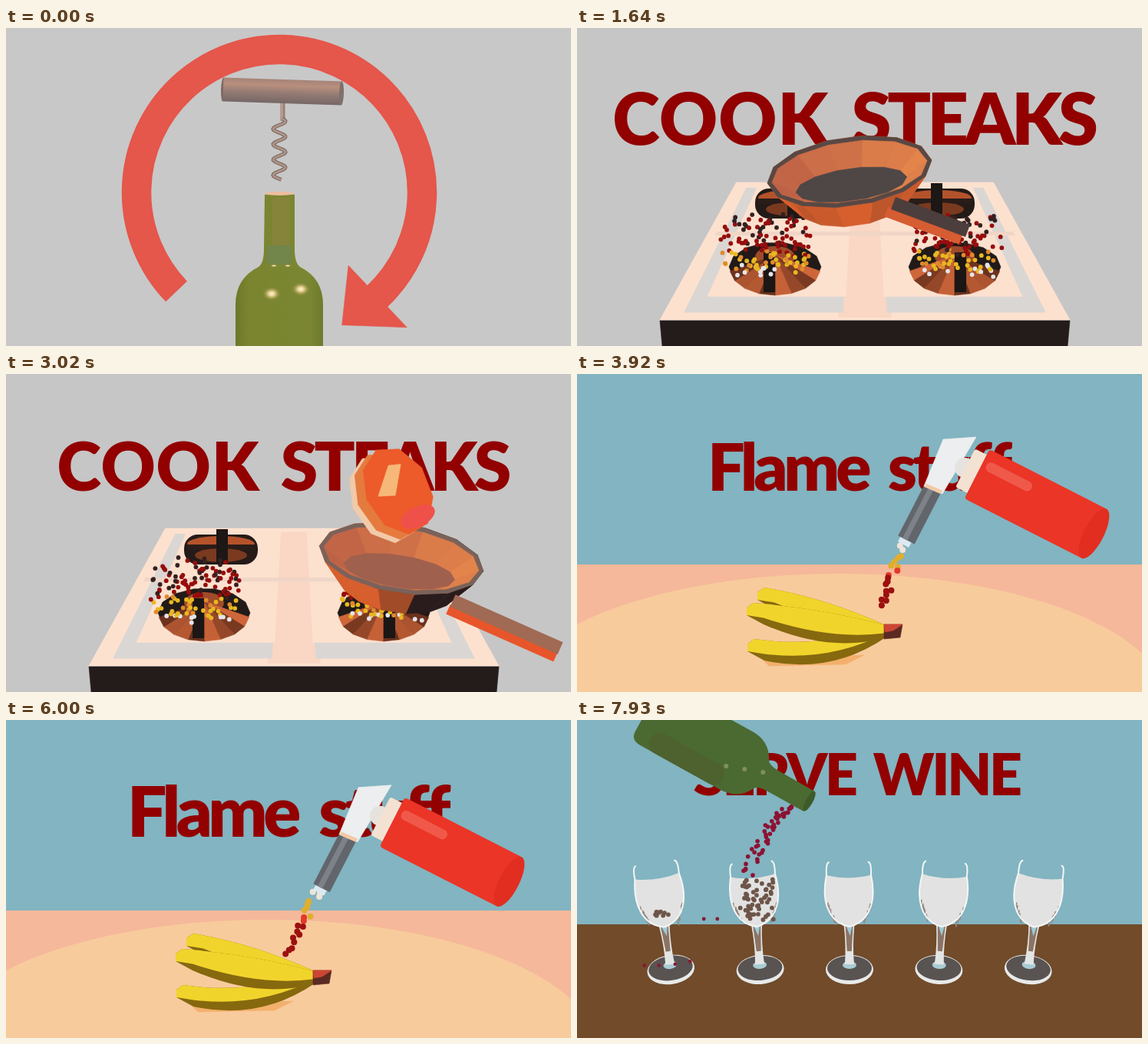
An HTML page for the animation above (8000 ms loop, 736x414 px).

```html
<!DOCTYPE html>
<html lang="en">
<head>
<meta charset="utf-8">
<title>Dinner steps</title>
<style>
html, body { margin: 0; width: 100%; height: 100%; overflow: hidden; background: #c6c6c6; }
svg { display: block; width: 100vw; height: 100vh; }
text { font-family: Lato, "Open Sans", sans-serif; font-weight: 900; fill: #920000; text-anchor: middle; }
</style>
</head>
<body>
<svg viewBox="0 0 736 414">
  <defs>
    <radialGradient id="glow">
      <stop offset="0" stop-color="#fff6d8"/>
      <stop offset=".35" stop-color="#e6cf90"/>
      <stop offset="1" stop-color="#8a8a3c" stop-opacity="0"/>
    </radialGradient>
    <linearGradient id="wood" x2="0" y2="1">
      <stop offset="0" stop-color="#a58478"/>
      <stop offset=".25" stop-color="#b98f7e"/>
      <stop offset=".55" stop-color="#967c74"/>
      <stop offset="1" stop-color="#756766"/>
    </linearGradient>
    <linearGradient id="green">
      <stop offset="0" stop-color="#6b7828"/>
      <stop offset=".15" stop-color="#7b8530"/>
      <stop offset=".85" stop-color="#7b8632"/>
      <stop offset="1" stop-color="#6c7c2c"/>
    </linearGradient>
    <linearGradient id="steel">
      <stop offset="0" stop-color="#869f95"/>
      <stop offset=".5" stop-color="#aabdaf"/>
      <stop offset="1" stop-color="#8da69b"/>
    </linearGradient>
  </defs>
  <g id="stage"></g>
</svg>
<script>
const LOOP = 8000;
const TAU = Math.PI * 2;
const SKY = '#82b4c1';
const stage = document.getElementById('stage');

const rand = n => { const v = Math.sin(n * 12.9898 + 4.1) * 43758.5453; return v - Math.floor(v); };
const clamp = v => Math.min(1, Math.max(0, v));
const mix = (a, b, k) => a + (b - a) * k;
const ease = v => { const k = clamp(v); return k * k * (3 - 2 * k); };
const times = (n, fn) => Array.from({ length: n }, (_, i) => fn(i)).join('');
const tone = (a, b, k) => `rgb(${a.map((v, i) => Math.round(mix(v, b[i], clamp(k))))})`;

const rect = (x, y, w, h, fill, r = 0) => `<rect x="${x}" y="${y}" width="${w}" height="${h}" rx="${r}" fill="${fill}"/>`;
const poly = (pts, fill) => `<polygon points="${pts}" fill="${fill}" stroke="${fill}" stroke-width=".6"/>`;
const ell = (x, y, rx, ry, fill) => `<ellipse cx="${x}" cy="${y}" rx="${rx}" ry="${ry}" fill="${fill}"/>`;
const dot = (x, y, r, fill) => `<circle cx="${x.toFixed(1)}" cy="${y.toFixed(1)}" r="${r}" fill="${fill}"/>`;
const path = (d, fill) => `<path d="${d}" fill="${fill}"/>`;
const line = (d, color, w) => `<path d="${d}" fill="none" stroke="${color}" stroke-width="${w}"/>`;
const bar = (x1, y1, x2, y2, w, color) => line(`M${x1} ${y1}L${x2} ${y2}`, color, w);
const group = (tf, inner) => `<g transform="${tf}">${inner}</g>`;

const polar = (x, y, rx, ry, a) => [x + rx * Math.cos(a), y + ry * Math.sin(a)];
const ring = (x, y, rx, ry, n, from = 0, span = TAU) =>
  Array.from({ length: n }, (_, i) => polar(x, y, rx, ry, from + span * i / n));

// Title of [word, tracking] pairs that swells and shrinks
function title(t, words, x, y, size, peak) {
  const s = 1 + 0.06 * Math.cos(TAU * (t - peak) / 575);
  const spans = words.map(([w, track]) => `<tspan letter-spacing="${track}em">${w}</tspan>`).join(' ');
  return group(`translate(${x} ${y}) scale(${s})`, `<text font-size="${size}" word-spacing=".08em">${spans}</text>`);
}

// Bottle with its mouth at the origin, standing upright
const bottle = fill => path('M-19 1Q0 -3 20 1V72Q20 90 27 95Q57 110 57 144V300Q57 320 40 320' +
  'H-40Q-57 320 -57 300V144Q-57 110 -27 95Q-20 90 -20 72Z', fill);

/* Corkscrew */
const turnPoint = (r, deg) => polar(356, 214, r, r, deg / 360 * TAU);
const arrow = line(`M${turnPoint(186, 136)}A186 186 0 1 1 ${turnPoint(186, 47)}`, '#e5564b', 38.5) +
  poly([turnPoint(131, 46.5), turnPoint(242, 46.5), turnPoint(191, 64.6)], '#e5564b');

const standing = group('translate(356 216)',
  bottle('url(#green)') + rect(-9, 5, 22, 63, '#86833a') + rect(-16, 67, 32, 25, '#72854a', 4) +
  ell(0, -.5, 18.5, 2.6, '#edbd9c') +
  [-1, 1].map(s => ell(2 + 9 * s, 93.5, 5, 2, 'url(#glow)') + ell(9 + 19 * s, 127 - 3 * s, 12, 9, 'url(#glow)')).join(''));

function corkscrew(turn) {
  const hx = 77 * Math.cos(turn), hy = 2.5 * Math.cos(turn) + 12 * Math.sin(turn);
  const half = Math.hypot(hx, hy), cap = 3 + 12 * Math.abs(Math.sin(turn));
  const coil = 'M' + Array.from({ length: 54 }, (_, i) =>
    [356 + 8 * Math.sin(TAU * i * 0.075 + 0.5 + turn), 118 + i * 1.5]).join('L');
  const handle = ell(-half, 0, cap, 15.5, '#7d6b66') +
    rect(-half, -15.5, half * 2, 31, 'url(#wood)') + ell(half, 0, cap, 15.5, '#80706b');
  return bar(360.5, 95, 360.5, 121, 6, '#9a8074') + bar(359.5, 95, 359.5, 121, 2, '#c3a597') +
    line(coil, '#84706a', 5) + line(coil, '#b59a8c', 2) +
    group(`translate(360 82.5) rotate(${Math.atan2(hy, hx) * 360 / TAU})`, handle);
}

function opening(t) {
  const deg = t * 0.09;
  return rect(0, 0, 736, 414, '#c8c8c8') + group(`rotate(${deg} 356 214)`, arrow) +
    group(`translate(0 ${t * 0.035})`, corkscrew(deg / 360 * TAU)) + standing;
}

/* Stove: u runs across the top, v from back to front */
const onTop = (u, v) => [375 + u * mix(167.5, 267, v), 201 + 179 * v];
const tile = (u0, v0, u1, v1, fill) => poly([onTop(u0, v0), onTop(u1, v0), onTop(u1, v1), onTop(u0, v1)], fill);
const CREAM = '#fde1cf';

function burners() {
  const edge = ring(258, 313, 59, 35, 9, 0.1, 3.3);
  const fan = times(8, i => poly([[258, 296], edge[i], edge[i + 1]],
    tone([104, 48, 28], [206, 102, 58], 0.5 + 0.5 * Math.cos(i * 2.3))));
  return rect(232, 209, 96, 39, '#241b19', 18) + ell(280, 221, 44, 10, '#b4532b') +
    rect(236, 222, 88, 7, '#2a1c18') + ell(280, 236, 34, 9, '#7a3a20') + rect(274, 202, 15, 45, '#1d1716') +
    poly(ring(258, 311, 60, 32, 14), '#211a18') + ell(258, 298, 26, 14, '#a04b2a') + fan +
    rect(243, 292, 15, 52, '#1c1615');
}

const halfTop = tile(-.9, .04, -.11, .945, '#dad6d3') + tile(-.82, .03, -.1, .83, CREAM) +
  tile(-.95, .36, 0, .385, '#f0d6c7') + burners();
const stove = tile(-1, 0, 1, 1, CREAM) + tile(-.13, .03, .13, .98, '#fad6c4') +
  halfTop + group('translate(750) scale(-1 1)', halfTop) +
  poly('108,381 642,381 639,414 111,414', '#241b1b');

function heat(k, seed) {
  if (k < 0.06) return '#e4e4ea';
  if (k < 0.35) return rand(seed) < 0.7 ? '#e8b820' : '#e08a2c';
  return rand(seed) < 1.3 - k ? '#960d0c' : '#352020';
}

function fire(t, cx, seed) {
  return times(140, i => {
    const k = (rand(i + seed) + t / 900) % 1;
    const x = cx + (rand(i * 3 + seed) - 0.5) * (94 + 24 * Math.sin(k * 3.1));
    return dot(x, 318 - 74 * k + (rand(i * 7) - 0.5) * 14, 2.9, heat(k, i + 60));
  });
}

const steakCut = (x, y, fill) => poly(ring(x, y, 60, 42, 9, 0.3), fill);
const steak = group('rotate(-50)', steakCut(2, 17, '#f2caa9') + steakCut(1, 9, '#e57a3e') + steakCut(0, -4, '#ec5b29') +
  ell(42, -12, 13, 24, '#ef514a')) + poly('-36,8 4,-2 14,18 -28,22', '#f6b878');

// Faceted bowl; k goes from the shaded to the lit pose
function bowl(k) {
  const n = 14;
  const facets = (a, b, paint) => times(n, i => {
    const j = (i + 1) % n;
    return poly([a[i], a[j], b[j], b[i]], paint(Math.cos((i + 0.5) / n * TAU), i));
  });
  const rim = ring(0, 0, 108, 45, n);
  return facets(rim, ring(0, 38, 74, 33, n), (c, i) =>
      tone([214, 95, 45], [42, 28, 28], 0.07 * (i % 3) + k * (2 * c + 0.3))) +
    poly(rim, tone([88, 72, 68], [122, 98, 90], k)) +
    facets(ring(0, 0, 102, 39, n), ring(0, 17, 72, 20, n), (c, i) =>
      tone([190, 98, 70], [232, 136, 76], 0.4 + 0.4 * c + 0.1 * (i % 2))) +
    poly(ring(0, 17, 73, 21, n), tone([78, 71, 70], [160, 96, 78], k));
}

function panAndSteak(t) {
  const k = ease((t - 1750) / 520);
  const rock = k * Math.sin(TAU * (t - 2340) / 1200);
  const x = mix(355, 515, k), y = mix(187, 243, k) + 7 * rock, tilt = mix(-8, 10, k) + 3 * rock;
  const fall = clamp((t - 1950) / 390), hop = clamp((t - 2800) / 700);
  const sy = mix(-70, 212, fall * fall) + 28 * ease((t - 2340) / 180) - 400 * hop * (1 - hop);
  const ax = mix(57, 67, k), ay = mix(41, 55, k), bx = mix(154, 207, k), by = mix(77, 117, k);
  const under = mix(9, 6, k);
  const handle = bar(ax - under, ay + 11, bx - under, by + 11, 14, tone([214, 92, 50], [232, 85, 42], k)) +
    bar(ax, ay, bx, by, 17, tone([76, 62, 60], [160, 106, 84], k));
  return group(`translate(${x} ${y})`, group(`rotate(${tilt})`, bowl(k))) +
    group(`translate(507 ${sy}) rotate(${80 * (fall - 1) + 360 * hop})`, steak) +
    group(`translate(${x} ${y})`, handle);
}

function cooking(t) {
  return rect(0, 0, 736, 414, '#c6c6c6') +
    title(t, [['COOK', 0.01], ['STEAKS', -0.055]], 360, 152, 92, 1525) +
    stove + fire(t, 246, 1) + fire(t, 495, 400) + panAndSteak(t);
}

/* Blowtorch */
function banana(x, y, rise, sag) {
  const skin = (s, fill) => path(`M${x} ${y}L${x + 9} ${y - 6}Q320 ${rise} 402 327V${343 - s / 3}` +
    `Q330 ${sag - s} ${x + 22} ${y + 22 - s / 2}L${x} ${y + 10}Z`, fill);
  return skin(0, '#86680f') + skin(17, '#f1d42b');
}

const bananas = poly('240,370 374,366 350,378 250,380', '#f3b06c') +
  banana(235, 284, 290, 345) + banana(222, 351, 358, 392) + banana(221, 304, 305, 364) +
  poly('400,326 424,326 421,343 400,345', '#5b2a22') + poly('400,326 424,326 412,334 401,336', '#cd4634');

const torch = bar(430, 213, 425, 222, 16, '#dce9f0') + bar(464, 148, 429, 216, 24, '#62666c') +
  bar(462, 148, 427, 215, 7, '#7d8188') +
  poly('477,85 520,82 476,156 452,146', '#eceef0') + bar(454, 145, 475, 154, 5, '#f3c9a5') +
  dot(505, 122, 13, '#e6e2dd') +
  group('translate(521 130) rotate(27)', rect(-17, -28, 24, 56, '#f3e2d2', 3) +
    rect(0, -36, 172, 72, '#ea3527', 4) + ell(171, 0, 13, 36, '#e22e20') + rect(6, -22, 66, 13, '#f0594a', 6));

const jetColor = k => k < 0.15 ? '#f0e4d8' : k < 0.42 ? '#e0ae2e' : k < 0.5 ? '#e23a28' : '#9c1010';

function jet(t, x, y, sway) {
  const reach = clamp((t - 3770) / 150);
  return times(19, i => {
    const k = (i / 19 + t / 240) % 1;
    if (k > reach) return '';
    const wobble = (rand(i + 50) - 0.5) * 15 * (1 - k * 0.4);
    return dot(x + mix(-28, -84, sway) * k + wobble, y + 86 * k + (rand(i + 9) - 0.5) * 6, 4, jetColor(k));
  });
}

function flaming(t) {
  const sway = (1 - Math.cos(TAU * (t - 3920) / 2500)) / 2;
  const dx = -71 * sway, dy = 11 * sway;
  return rect(0, 248, 736, 166, '#f5b89a') + ell(340, 430, 430, 170, '#f8cb9d') + rect(0, 0, 736, 248, SKY) +
    title(t, [['Flame', -0.06], ['stuff', -0.06]], 366, 152, 90, 4150) +
    bananas + jet(t, 424 + dx, 219 + dy, sway) + group(`translate(${dx} ${dy})`, torch);
}

/* Cutlery */
const scoop = (y, r, end) => ell(0, y, r, r * 1.5, 'url(#steel)') + ell(-1, y - 2, r * .8, r * 1.15, '#a3b8ac') +
  bar(0, y + r * 1.3, 0, end, r / 3 + 2.5, '#8da69a');
const spoon = scoop(258, 16, 372), smallSpoon = scoop(278, 10, 353);
const fork = times(4, i => rect(-9 + i * 4.7, 237, 3, 26, '#91a99e')) +
  path('M-9 260H8Q9 273 4 279L5 375H-4L-3 279Q-9 273 -9 260Z', '#94aca1');
const knife = path('M4 235Q-4 236 -6 262L-8 305L-3 310V375H5L6 238Z', '#91a99f');
const row = [[42, spoon], [89, spoon], [127, fork], [155, smallSpoon], [194, spoon], [229, knife], [250, knife]];

function setting(t) {
  const pieces = times(21, i => {
    const [x, item] = row[i % 7], k = clamp((t - 6682 - i * 23) / 50);
    return k ? group(`translate(${x + 227 * Math.floor(i / 7)} ${180 * (1 - k)})`, item) : '';
  });
  return rect(0, 0, 736, 414, '#fcdab2') +
    ell(130, 240, 262, 146, '#fce6bb') + ell(120, 205, 190, 132, '#fdf2ca') +
    ell(650, 190, 128, 108, '#fce4b8') + rect(0, 0, 736, 165, SKY) +
    title(t, [['Set', -0.06], ['the', -0.06], ['table', -0.06]], 347, 184, 103, 6542) + pieces;
}

/* Wine */
// Glass with the centre of its foot at the origin
function goblet(seed) {
  const streaks = times(16, i => {
    const side = i % 2 ? 1 : -1, k = rand(i + seed);
    return rect(side * (29 - 11 * k), -88 + 26 * k, 1.5, 4 + 5 * rand(i), '#96877d');
  });
  return ell(0, 2, 31, 19, '#e8eaea') + ell(0, 0, 29, 16, '#595452') + ell(0, -4, 9, 5, '#a9ccd4') +
    path('M-7 -57H7Q4 -30 6 -5H-6Q-4 -30 -7 -57Z', '#e3e5e5') + path('M-5 -55H5L3 -22H-3Z', '#8b7465') +
    path('M-4 -55H4L1 -42Z', '#9ecbd6') +
    path('M-29 -121Q0 -114 29 -121C36 -89 28 -60 0 -54C-28 -60 -36 -89 -29 -121Z', '#e2e2e2') + streaks +
    line('M-25 -138Q-30 -138 -29 -121C-36 -89 -28 -60 0 -54C28 -60 36 -89 29 -121Q30 -138 25 -138', '#f4f6f6', 2);
}

const goblets = times(5, i => group(`translate(${122 + 116.5 * i} 323) rotate(${4 * i - 8.5})`, goblet(i * 20)));

const tipped = group('translate(303 106) rotate(119) scale(.76)',
  bottle('#4a6a31') + rect(20, 150, 37, 140, '#4d622e', 16) + ell(0, 1, 19, 6, '#3e5a2a')) +
  times(3, i => dot(194 + 24 * i, 60 + 4 * i, 3, '#7f8f60'));

function pouring(t) {
  const shift = at => (at - 7930) * 0.32;
  const stream = times(58, i => {
    const age = (i * 4 + t % 240) % 240;
    return dot(297 + shift(t - age) + (rand(i) - 0.5) * 17, 109 + 0.0016 * age * age + (rand(i + 80) - 0.5) * 11, 2.8, '#8c1233');
  });
  // Drops settle one by one in a column inside a glass
  const settled = (n, from, x, w, y, h) => times(n, i => t > from + i * 5
    ? dot(x + (rand(i + 7) - 0.5) * w, y - h * (i / n) + (rand(i + 30) - 0.5) * 8, 2.9, '#6d5548') : '');
  const spills = times(6, i => t > 7480 + i * 50
    ? dot(86 + 19 * i + 5 * rand(i), i < 4 ? 310 + 12 * rand(i + 2) : 259, 2.4, '#861a32') : '');
  return rect(0, 0, 736, 267, SKY) + rect(0, 266, 736, 148, '#714b2a') +
    title(t, [['SERVE', -0.045], ['WINE', -0.045]], 364, 98, 75, 7786) + goblets +
    settled(9, 7450, 108, 22, 254, 4) + settled(55, 7640, 234, 44, 260, 54) +
    spills + stream + group(`translate(${shift(t)})`, tipped);
}

const scenes = [[1090, opening], [3780, cooking], [6420, flaming], [7370, setting], [LOOP, pouring]];
const start = performance.now();

function draw() {
  const t = (performance.now() - start) % LOOP;
  stage.innerHTML = scenes.find(([end]) => t < end)[1](t);
  requestAnimationFrame(draw);
}
draw();
</script>
</body>
</html>
```
